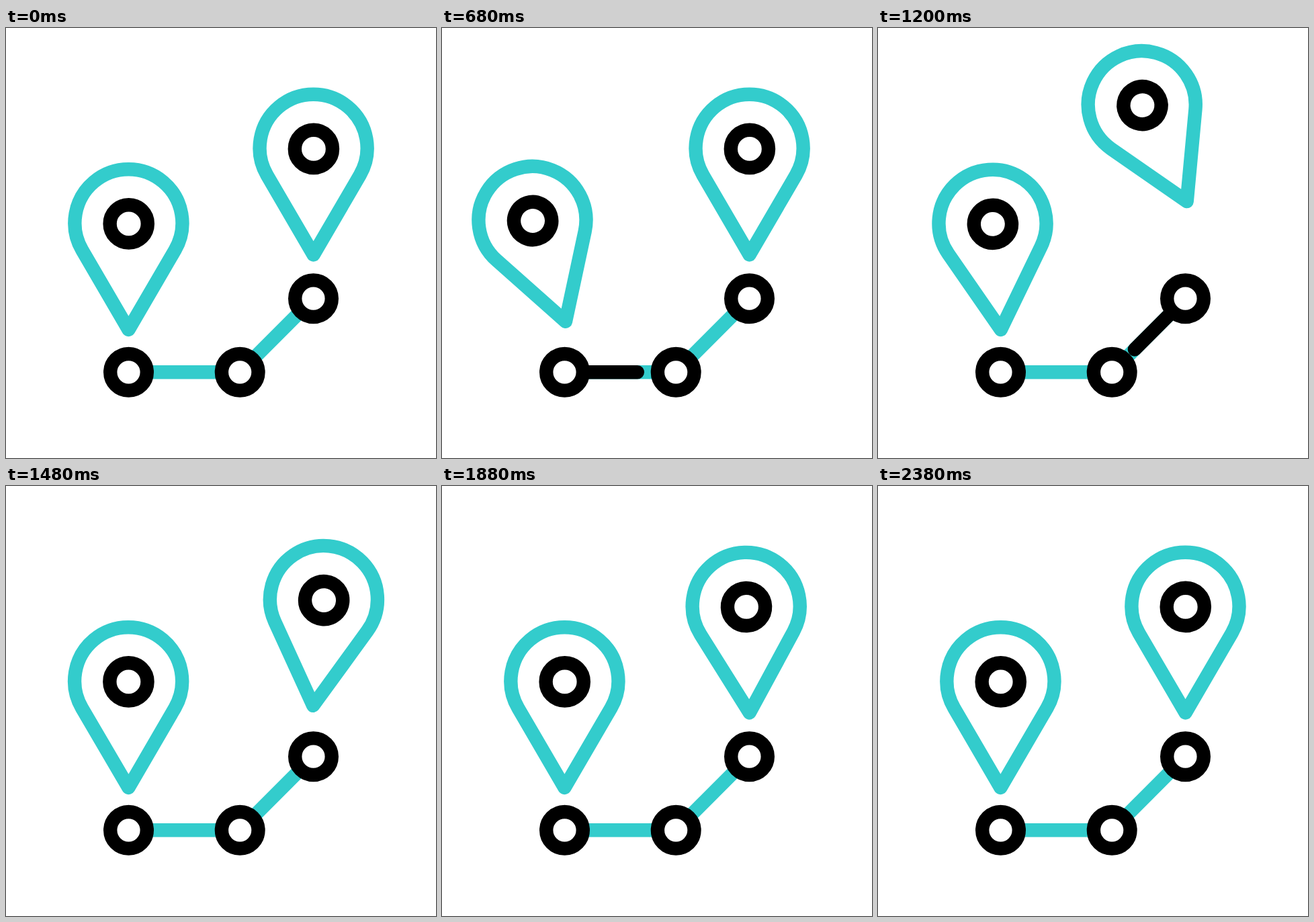
Write an HTML page that moves like this. It is 640 px wide and 640 px high and loops after 2400 ms.

```html
<!DOCTYPE html>
<html lang="en">
<head>
<meta charset="utf-8">
<title>Route pins</title>
<style>
html, body { margin: 0; width: 100%; height: 100%; overflow: hidden; background: #fff; }
svg { display: block; width: 100vw; height: 100vh; }
.teal { stroke: #33cccc; }
.black { stroke: #000; }
</style>
</head>
<body>
<svg viewBox="0 0 640 640" fill="none" stroke-width="20.4" stroke-linecap="round" stroke-linejoin="round">
  <defs>
    <!-- pin with its swing pivot at 0,0 -->
    <g id="pin">
      <path class="teal" d="M0 5 L-69.2 -113.6 A80 80 0 1 1 69.2 -113.6 Z"/>
      <circle class="black" cx=".3" cy="-152.6" r="28.1"/>
    </g>
    <circle id="node" class="black" r="27.3" fill="#fff"/>
  </defs>
  <path class="teal" d="M182.5 512.3H348.2L457.5 402.7"/>
  <path class="black" id="dash" d="M182.5 512.3H348.2L457.5 402.7"/>
  <use href="#node" x="182.5" y="512.3"/>
  <use href="#node" x="348.2" y="512.3"/>
  <use href="#node" x="457.5" y="402.7"/>
  <use href="#pin" id="pinA"/>
  <use href="#pin" id="pinB"/>
</svg>
<script>
const LOOP = 2400;
const el = id => document.getElementById(id);
const dash = el('dash');
const len = dash.getTotalLength();

// keys: [time, value] pairs, eased in and out between neighbours
function track(keys, t) {
  if (t <= keys[0][0]) return keys[0][1];
  for (let i = 1; i < keys.length; i++) {
    const [t0, a] = keys[i - 1], [t1, b] = keys[i];
    if (t < t1) {
      const u = (t - t0) / (t1 - t0);
      return a + (b - a) * u * u * (3 - 2 * u);
    }
  }
  return keys[keys.length - 1][1];
}

const hop = start => [[0, 0], [560, -80], [720, 0], [960, -40], [1120, 0]]
  .map(([t, v]) => [t + start, v]);

const swing = times => times.map((t, i) => [t, [0, -26.2, 13.4, -7.3, 3.5, -2, 0][i]]);

const pins = [
  { node: el('pinA'), x: 182.4, y: 444, hop: hop(0),
    swing: swing([0, 600, 880, 1120, 1360, 1560, 1760]) },
  { node: el('pinB'), x: 457.6, y: 332.5, hop: hop(680),
    swing: swing([680, 1280, 1560, 1760, 2000, 2200, 2400]) }
];

const head = [[400, 0], [1120, 1]];
const tail = [[760, 0], [1480, 1]];

function draw(t) {
  for (const p of pins) {
    const y = p.y + track(p.hop, t);
    p.node.setAttribute('transform', `translate(${p.x} ${y}) rotate(${track(p.swing, t)})`);
  }
  const from = track(tail, t) * len, to = track(head, t) * len;
  const shown = to - from > 0.1;
  dash.style.display = shown ? '' : 'none';
  if (shown) {
    dash.setAttribute('stroke-dasharray', `${to - from} ${2 * len}`);
    dash.setAttribute('stroke-dashoffset', -from);
  }
}

const begin = performance.now();
function tick() {
  draw((performance.now() - begin) % LOOP);
  requestAnimationFrame(tick);
}
draw(0);
requestAnimationFrame(tick);
</script>
</body>
</html>
```
